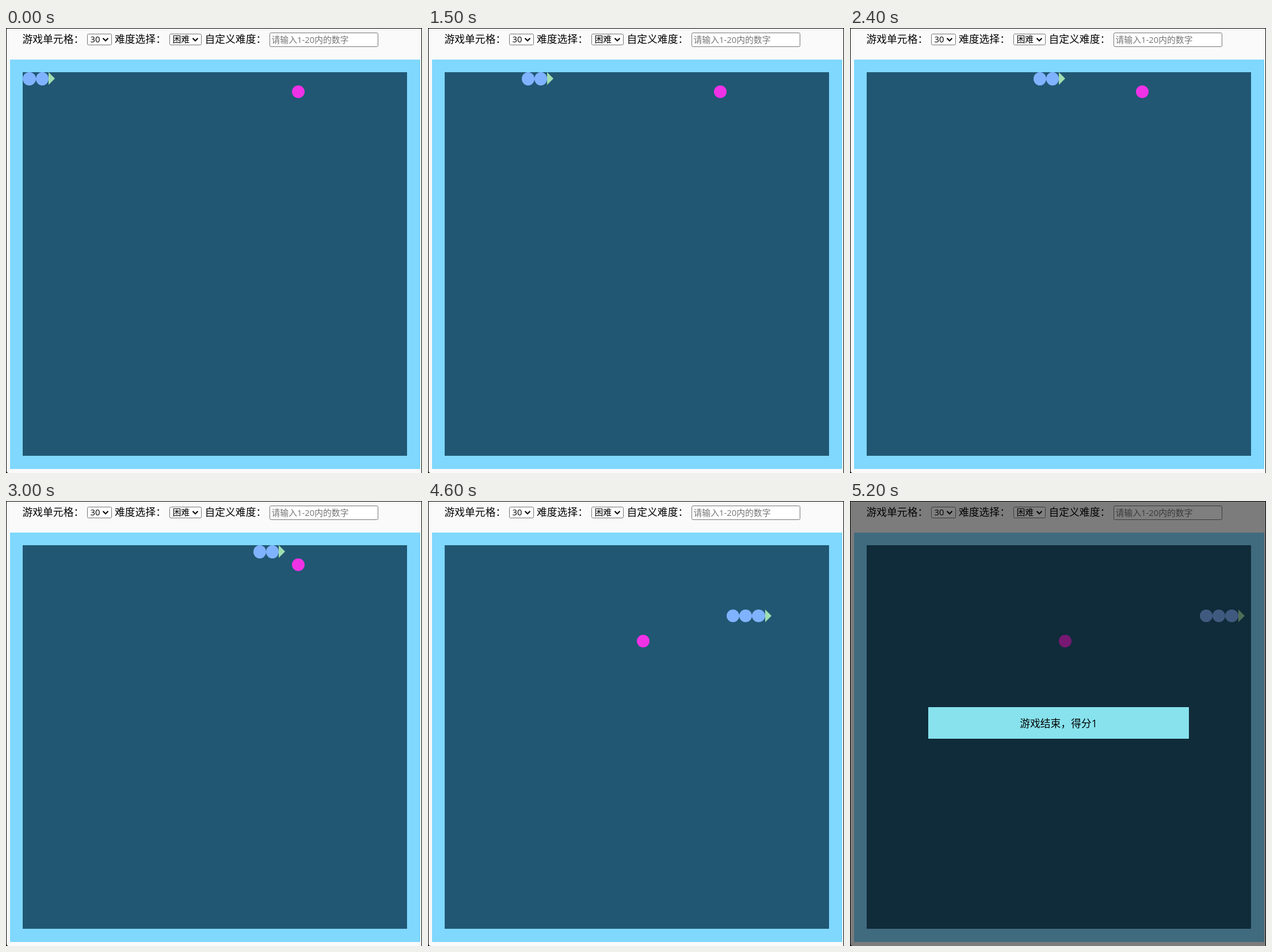
Animation, 723 px wide and 775 px high, one loop 6.6 s. Source, as an HTML page with a canvas:

```html
<!DOCTYPE html>
<html lang="zh-CN">
<head>
<meta charset="utf-8">
<title>贪吃蛇</title>
<style>
html, body { margin: 0; width: 100%; height: 100%; overflow: hidden; background: #fafafa; }
canvas { display: block; }
</style>
</head>
<body>
<canvas id="stage" width="723" height="775"></canvas>
<script>
const ctx = document.getElementById('stage').getContext('2d');
const LOOP = 6600, OVER_AT = 5200;
const CELL = 22.25, LEFT = 29.3, TOP = 77.4;
const FONT = '"Open Sans", "Noto Sans CJK SC", "Noto Sans CJK", sans-serif';

// Moments at which the snake advances one cell
const moves = [800, 1000, 1100, 1200, 1400, 1500, 1600, 1700, 1900, 2000, 2100,
  2300, 2400, 2500, 2600, 2800, 2900, 3000, 3200, 3400, 3600, 3700, 3800, 3900,
  4200, 4300, 4400, 4600, 4700, 4800, 4900, 5100];
const EAT_STEP = 20, DOWN_STEPS = 5, TURN_COL = 21;

// Cell reached by the head after n moves (negative n: the starting body)
function cellAt(n) {
  const down = Math.min(Math.max(n - EAT_STEP + 1, 0), DOWN_STEPS);
  return [n + 2 - down, down];
}

function rect(x, y, w, h, color) {
  ctx.fillStyle = color;
  ctx.fillRect(x, y, w, h);
}

function text(str, x, y, size, color = '#000', align = 'left') {
  ctx.font = `${size}px ${FONT}`;
  ctx.fillStyle = color;
  ctx.textAlign = align;
  ctx.fillText(str, x, y);
}

function box(x, y, w, h) {
  ctx.beginPath();
  ctx.roundRect(x + 0.5, y + 0.5, w - 1, h - 1, 2);
  ctx.fillStyle = '#fff';
  ctx.fill();
  ctx.strokeStyle = '#767676';
  ctx.lineWidth = 1;
  ctx.stroke();
}

function select(label, x, w) {
  box(x, 10, w, 20);
  text(label, x + 5.5, 25, 14.83);
  const cx = x + w - 11;
  ctx.beginPath();
  ctx.moveTo(cx - 4.5, 17.8);
  ctx.lineTo(cx, 22.3);
  ctx.lineTo(cx + 4.5, 17.8);
  ctx.strokeStyle = '#000';
  ctx.lineWidth = 2;
  ctx.stroke();
}

// Pixel-snapped bounds of a grid cell
function bounds([col, row]) {
  const x = Math.round(LEFT + col * CELL), y = Math.round(TOP + row * CELL);
  return [x, y, Math.round(LEFT + (col + 1) * CELL) - x, Math.round(TOP + (row + 1) * CELL) - y];
}

function dot(cell, color) {
  const [x, y, w, h] = bounds(cell);
  ctx.beginPath();
  ctx.ellipse(x + w / 2, y + h / 2, w / 2, h / 2, 0, 0, Math.PI * 2);
  ctx.fillStyle = color;
  ctx.fill();
}

function head(cell, down) {
  const [x, y] = bounds(cell);
  ctx.beginPath();
  ctx.moveTo(x, y);
  if (down) {
    ctx.lineTo(x + 22, y);
    ctx.lineTo(x + 11, y + 11);
  } else {
    ctx.lineTo(x + 11, y + 11);
    ctx.lineTo(x, y + 22);
  }
  ctx.fillStyle = '#a0deb0';
  ctx.fill();
}

function toolbar() {
  text('游戏单元格：', 28.5, 25.5, 17.8);
  select('30', 141, 43);
  text('难度选择：', 189, 25.5, 17.8);
  select('困难', 284, 56);
  text('自定义难度：', 345.5, 25.5, 17.8);
  box(458, 8, 189, 25);
  text('请输入1-20内的数字', 461.5, 25.5, 14.83, '#757575');
}

function snake(step) {
  const size = step >= EAT_STEP ? 3 : 2;
  for (let i = size; i > 0; i--) dot(cellAt(step - i), '#80b3ff');
  const down = step >= EAT_STEP && step < EAT_STEP + DOWN_STEPS;
  head(cellAt(step), down);
}

function draw(t) {
  const step = moves.filter(m => m <= t).length;
  rect(0, 0, 723, 775, '#000');
  ctx.beginPath();
  ctx.roundRect(1, 1, 721, 774, [0, 0, 0, 4]);
  ctx.fillStyle = '#fafafa';
  ctx.fill();
  toolbar();
  rect(7, 55, 713, 713, '#80d8ff');
  rect(29, 77, 668, 668, '#215773');
  dot(step < EAT_STEP ? [TURN_COL, 1] : [15, 7], '#f032e6');
  snake(step);
  if (t >= OVER_AT) {
    rect(0, 1, 722, 774, 'rgba(0,0,0,0.5)');
    rect(136, 359, 453, 55, '#87e2ed');
    text('游戏结束，得分1', 362.5, 393.5, 17.8, '#000', 'center');
  }
}

const start = performance.now();
function tick() {
  draw((performance.now() - start) % LOOP);
  requestAnimationFrame(tick);
}
tick();
</script>
</body>
</html>
```
